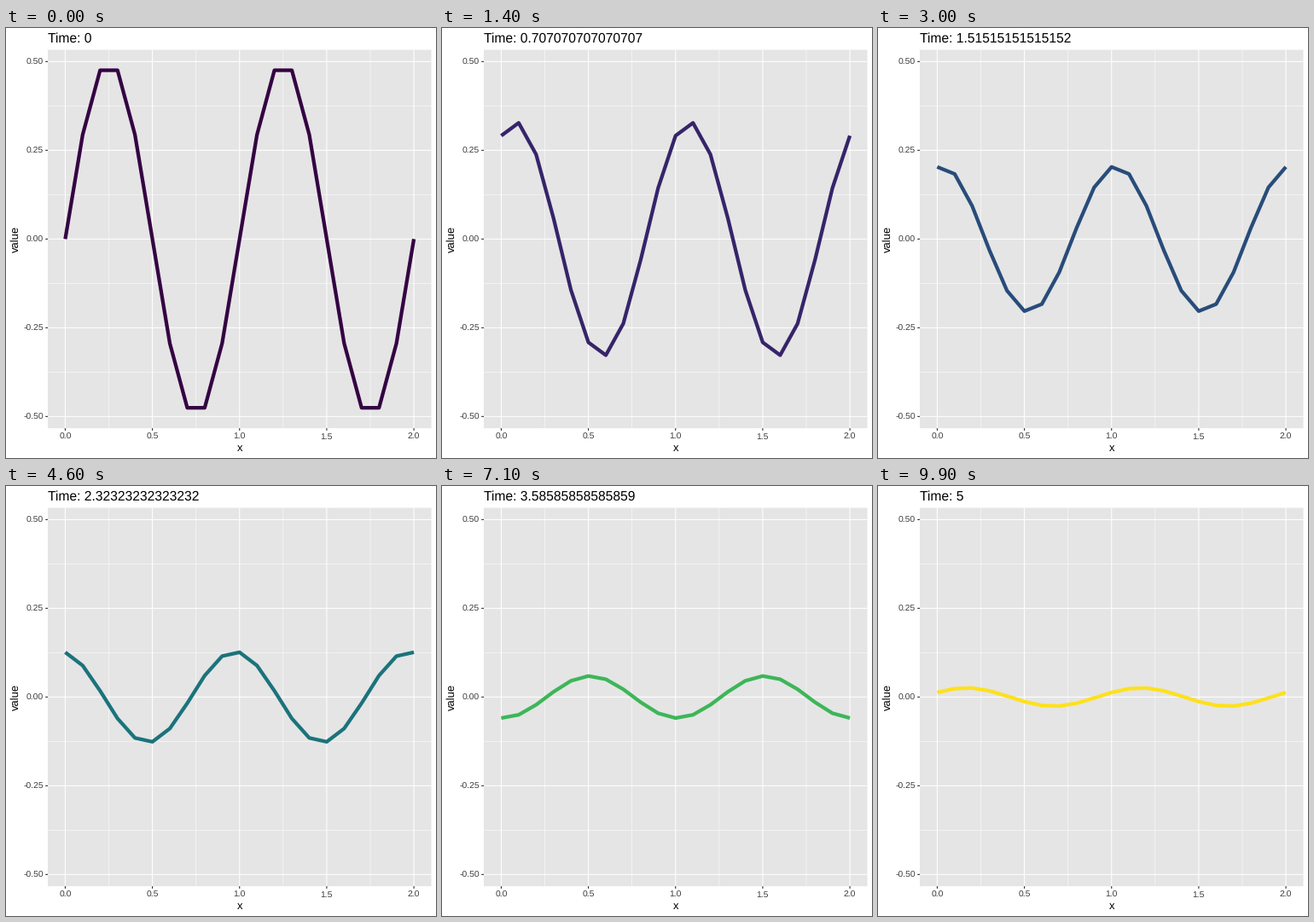
These frames come from a looping animation (504 by 504 pixels, 10 s). A matplotlib script:

```python
import numpy as np
import matplotlib
import matplotlib.pyplot as plt
from matplotlib.animation import FuncAnimation

matplotlib.rcParams.update({
    "font.family": "Liberation Sans",
    "text.hinting": "no_hinting",
})

SIZE, DPI = 504, 72
FRAMES, INTERVAL = 100, 100
LEFT, RIGHT, TOP, BOTTOM = 49, 498.5, 25.6, 469.1
GRID_W = 1.067
TICK = 2.75

# Advection-diffusion: explicit central scheme on a sine wave
COURANT, DIFFUSION = 0.6, 0.25
DX = 0.1
theta = 2 * np.pi * DX
GAIN = 1 - 2 * DIFFUSION * (1 - np.cos(theta)) - 1j * COURANT * np.sin(theta)
xs = np.arange(21) * DX


def wave(step):
    return 0.5 * np.imag(GAIN ** step * np.exp(2j * np.pi * xs))


Y_LIM = 1.1 * np.abs(wave(1)).max()


def px(x):
    return LEFT + (RIGHT - LEFT) * (x + 0.1) / 2.2


def py(v):
    return (TOP + BOTTOM) / 2 - (BOTTOM - TOP) / 2 * v / Y_LIM


def display_colour(rgb):
    """sRGB colour re-encoded with a 1.8 gamma."""
    c = np.asarray(rgb)
    linear = np.where(c <= 0.04045, c / 12.92, ((c + 0.055) / 1.055) ** 2.4)
    return tuple(linear ** (1 / 1.8))


fig = plt.figure(figsize=(SIZE / DPI, SIZE / DPI), dpi=DPI, facecolor="white")
ax = fig.add_axes([0, 0, 1, 1])
ax.set_xlim(0, SIZE)
ax.set_ylim(SIZE, 0)
ax.axis("off")


def segment(x, y, colour, width, z):
    ax.plot(x, y, color=colour, lw=width, zorder=z, snap=False,
            solid_capstyle="butt")


def label(x, y, text, size, colour="black", **kw):
    return ax.text(x, y, text, fontsize=size, color=colour, va="baseline", **kw)


ax.add_patch(plt.Rectangle((LEFT, TOP), RIGHT - LEFT, BOTTOM - TOP,
                           fc="#e5e5e5", ec="none", zorder=0, snap=False))

for x in np.arange(0.25, 2, 0.5):
    segment([px(x)] * 2, [TOP, BOTTOM], "white", GRID_W / 2, 1)
for v in np.arange(-0.375, 0.5, 0.25):
    segment([LEFT, RIGHT], [py(v)] * 2, "white", GRID_W / 2, 1)

for x in np.arange(0, 2.1, 0.5):
    segment([px(x)] * 2, [TOP, BOTTOM], "white", GRID_W, 2)
    segment([px(x)] * 2, [BOTTOM, BOTTOM + TICK], "#262626", GRID_W, 2)
    label(px(x), 481.6, f"{x:.1f}", 10.4, "#3c3c3c", ha="center")
for v in np.arange(-0.5, 0.6, 0.25):
    segment([LEFT, RIGHT], [py(v)] * 2, "white", GRID_W, 2)
    segment([LEFT - TICK, LEFT], [py(v)] * 2, "#262626", GRID_W, 2)
    label(44, py(v) + 3.7, f"{v:.2f}", 10.4, "#3c3c3c", ha="right")

label((LEFT + RIGHT) / 2, 495.8, "x", 13, ha="center")
label(14.9, py(0), "value", 13, ha="center", rotation=90,
      rotation_mode="anchor")
title = label(LEFT, 16.8, "", 15.6)

line, = ax.plot([], [], lw=4.27, zorder=3, solid_capstyle="butt",
                solid_joinstyle="round")
viridis = matplotlib.colormaps["viridis"]


def update(i):
    # 101 solver steps share 100 frames, so one is skipped halfway
    step = i + (i >= FRAMES // 2)
    line.set_data(px(xs), py(wave(step)))
    line.set_color(display_colour(viridis(step / 100)[:3]))
    title.set_text(f"Time: {5 * i / (FRAMES - 1):.15g}")
    return line, title


anim = FuncAnimation(fig, update, frames=FRAMES, interval=INTERVAL,
                     repeat=True, repeat_delay=0, blit=False)
plt.show()
```
